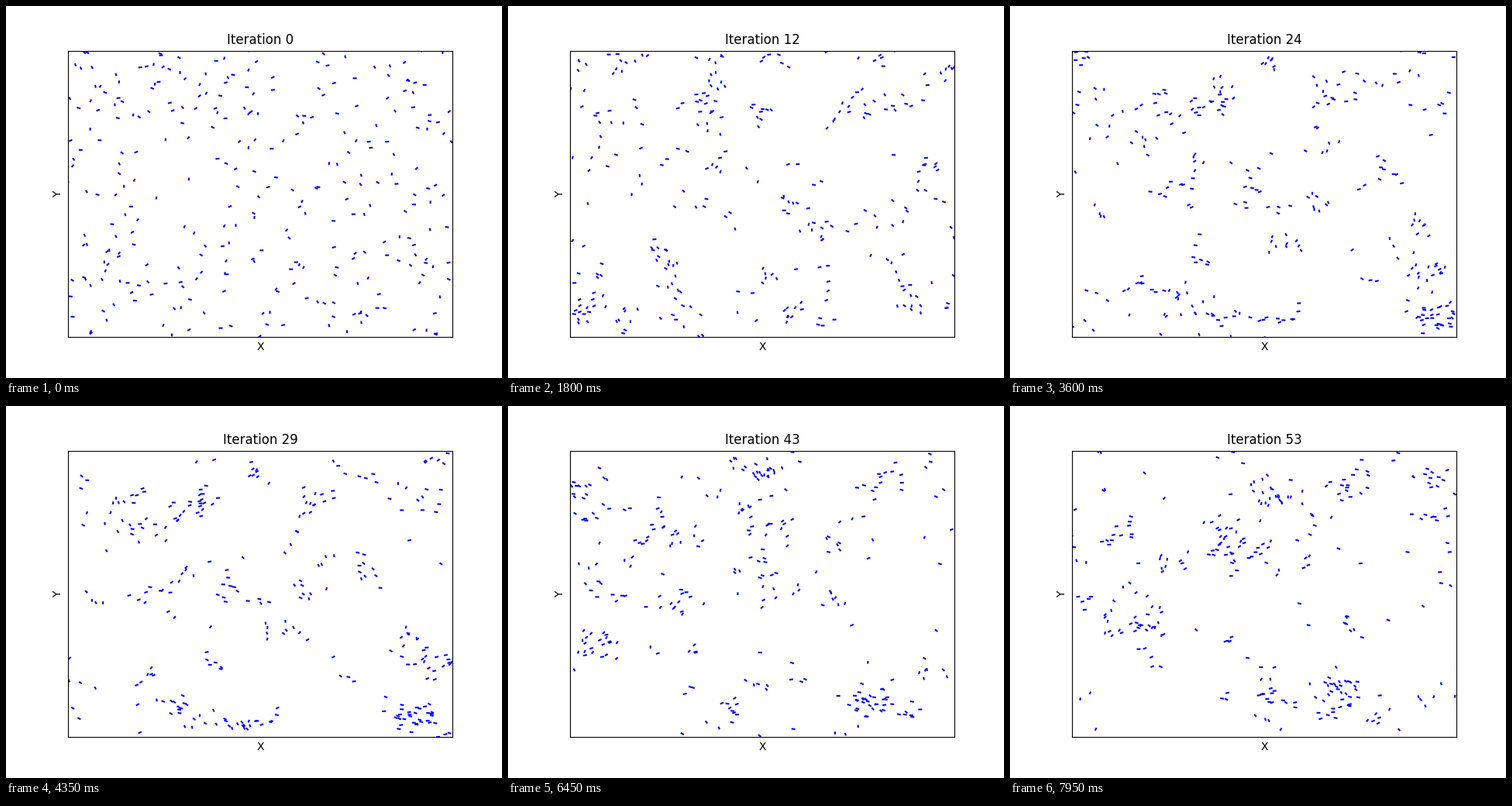
Animation of 640x480 px, one loop 8 s. Source, as a matplotlib script:

```python
import numpy as np
import matplotlib.pyplot as plt
from matplotlib.animation import FuncAnimation
from matplotlib.collections import LineCollection

COUNT, SIZE, SPEED = 300, 100, 1.0
RADIUS, NOISE = 4.0, 0.6
STEPS, TICK_MS, TICKS_PER_STEP, TICKS = 54, 50, 3, 160


def neighbours(pos):
    """Pairs closer than RADIUS on the periodic square."""
    gap = pos[:, None] - pos[None]
    gap -= SIZE * np.round(gap / SIZE)
    return (gap ** 2).sum(axis=2) < RADIUS ** 2


def direction(angle):
    return np.column_stack([np.cos(angle), np.sin(angle)])


def simulate():
    """Vicsek flocking: each particle takes its neighbours' mean heading plus noise."""
    rng = np.random.default_rng(12)
    pos = rng.uniform(0, SIZE, (COUNT, 2))
    angle = rng.uniform(-np.pi, np.pi, COUNT)
    history = []
    for _ in range(STEPS):
        heading = direction(angle)
        history.append(np.stack([pos, pos + SPEED * heading], axis=1))
        pos = (pos + SPEED * heading) % SIZE
        mean = neighbours(pos) @ heading
        angle = np.arctan2(mean[:, 1], mean[:, 0])
        angle += rng.uniform(-NOISE, NOISE, COUNT)
    return history


history = simulate()

fig, ax = plt.subplots(figsize=(6.4, 4.8), dpi=100)
ax.set(xlim=(0, SIZE), ylim=(0, SIZE), xticks=[], yticks=[], xlabel="X", ylabel="Y")
title = ax.set_title("Iteration 0")
particles = LineCollection(history[0], colors="blue", linewidths=1.5)
ax.add_collection(particles, autolim=False)


def update(tick):
    step = tick // TICKS_PER_STEP
    particles.set_segments(history[step])
    title.set_text(f"Iteration {step}")
    return particles, title


animation = FuncAnimation(fig, update, frames=TICKS, interval=TICK_MS,
                          repeat=True, repeat_delay=0, cache_frame_data=False)
plt.show()
```
